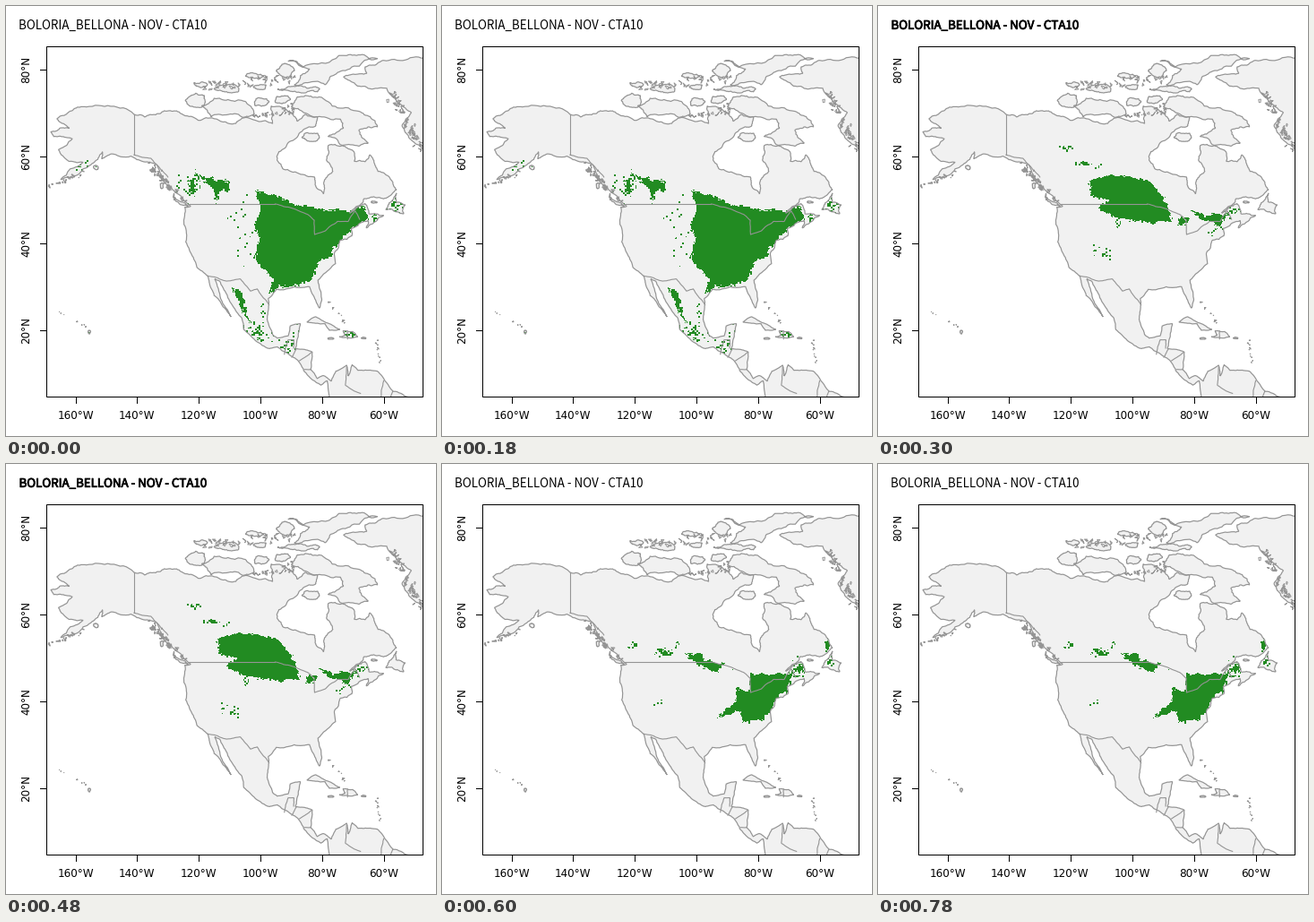
Recreate the animation shown at these times as a matplotlib script. Size 480 by 480 pixels, loop 900 ms.

```python
import numpy as np
import matplotlib.pyplot as plt
from matplotlib.animation import FuncAnimation
from matplotlib.patches import Polygon, Rectangle
from matplotlib.path import Path
from matplotlib.patheffects import withStroke

SIZE = 480
LAND, COAST, GREEN = "#f1f1f1", "#949494", (34, 139, 34, 255)
rng = np.random.default_rng(11)

fig = plt.figure(figsize=(SIZE / 72, SIZE / 72), dpi=72, facecolor="white")
ax = fig.add_axes([0, 0, 1, 1])
ax.axis("off")
box = Rectangle((44.5, 44.5), 420, 391, fill=False, ec="black", lw=1, zorder=9)
ax.add_patch(box)
lands = []


def project(*coords):
    """Degrees west, degrees north -> pixels."""
    w, n = np.reshape(coords, (-1, 2)).T
    return np.column_stack([627.9 - 3.44 * w, 459.2 - 4.86 * n])


def rough(p, amp):
    """Break each segment up by midpoint displacement."""
    for _ in range(4):
        d = np.diff(p, axis=0)
        mid = p[:-1] + d / 2 + rng.uniform(-amp, amp, (len(d), 1)) * d[:, ::-1] * (-1, 1)
        out = np.empty((len(p) + len(mid), 2))
        out[::2], out[1::2] = p, mid
        p = out
    return p


def land(p, lw=1.2):
    lands.append(Path(p))
    for patch in (Polygon(p, fc=LAND, ec="none", zorder=1),
                  Polygon(p, fill=False, ec=COAST, lw=lw, zorder=4)):
        ax.add_patch(patch)
        patch.set_clip_path(box)


def isle(*coords, amp=0.16):
    p = project(*coords)
    land(rough(np.vstack([p, p[:1]]), amp))


def oval(w, n, rw, rn):
    a = np.linspace(0, 2 * np.pi, 9)[:-1]
    r = rng.uniform(0.7, 1.15, 8)
    isle(*np.column_stack([w + rw * r * np.cos(a), n + rn * r * np.sin(a)]).ravel())


def islets(count, size, *line):
    """Tiny islands strewn along a line."""
    p = project(*line)
    for t in rng.uniform(0, 1, count):
        c = p[0] + t * (p[1] - p[0]) + rng.normal(0, size, 2)
        land(c + rng.uniform(-size, size, (4, 2)), 0.9)


def border(*coords, amp=0.05):
    line, = ax.plot(*rough(project(*coords), amp).T, color=COAST, lw=1.1, zorder=4)
    line.set_clip_path(box)


# Mainland, clockwise from the Bering Strait
north_coast = project(
    168, 65.6, 162, 66.4, 166, 68.6, 162, 70.2, 156.5, 71.3, 141, 69.6,
    134, 69.5, 128, 70.4, 125, 69.5, 115, 68.6, 108, 67.5, 106, 68.7,
    96, 67.5, 96.5, 71.5, 92, 71, 88, 68, 85.5, 69.6, 81.5, 69, 82, 67,
    87, 65.5, 94, 61, 94.5, 59, 92.5, 57, 82.4, 55.2, 82, 53, 79.5, 51.3,
    79.2, 54.5, 76.5, 56.5, 78.5, 59, 78, 62.4, 73.5, 62.4, 69.6, 61,
    69.5, 58.8, 66, 58.7, 64.5, 60.3, 61.8, 56.5, 57.5, 54.5, 55.8, 52.3,
    60, 50.2, 66.4, 50.2, 71, 46.9, 66, 49.1, 64.8, 46.8, 60, 46.4,
    65.6, 43.5, 65, 45.2, 70.5, 43.4, 70.3, 41.7, 74, 40.7, 76, 37.5)
south_coast = project(
    75.6, 35.3, 81.3, 31.5, 80.1, 26.8, 80.8, 25.1, 82.8, 28, 84, 30,
    89, 30, 94.8, 29.4, 97.4, 27.3, 97.8, 22.5, 96, 19, 94.5, 18.2, 91, 18.7,
    90.3, 21, 87, 21.5, 88.6, 15.8, 83.2, 15, 83.7, 11, 81.5, 8.9, 79.6, 9.6,
    77, 8.3, 75.5, 10.6, 72, 12, 71.5, 9.5, 70.2, 12.1, 68.3, 10.8, 62, 10.6,
    57, 6, 52, 4.6, 77.5, 3, 78.3, 8.4, 80.3, 7.4, 85.7, 10.5, 88, 13.2,
    94.5, 16.2, 97, 15.8, 105.4, 20.2, 106, 22.8, 109.5, 26.2, 113.1, 31.2,
    114.8, 31.8, 109.5, 23.1, 112.2, 25.5, 115, 28, 117.1, 32.5, 120.6, 34.5,
    124.2, 40.3)
west_coast = project(
    124.2, 40.3, 124.5, 48.3, 122.6, 48.5, 128, 52, 133.6, 58, 142, 60,
    148.5, 60.5, 151.5, 59.4, 151.2, 61, 155, 58, 164.8, 54.6, 157.5, 58.6,
    162, 58.8, 165.5, 61.5, 161, 64, 167, 64.5)
land(np.vstack([rough(north_coast, .13), rough(south_coast, .07),
                rough(west_coast, .1)]))

# Islands
isle(46, 82.7, 60, 82, 66, 80.5, 65.5, 79, 73, 78.2, 68.5, 76.1, 59, 75.6,
     55, 72, 51, 70, 54, 67, 51.5, 64, 46, 60.5, amp=.1)
isle(89.9, 71.3, 88, 73.6, 81, 73.6, 68, 70.3, 62, 66.7, 68, 66, 65, 63,
     68, 62.3, 78, 64.5, 73, 66.5, 74, 68.5, 86, 70)
isle(89, 76.4, 79, 76.4, 74, 79.5, 62, 82.4, 72, 83.1, 91, 81.8, 84, 80, 87, 78.5)
isle(117, 70, 119, 71.6, 115, 73.3, 106, 72.8, 102, 69.8, 106, 69, 116, 69)
isle(59.3, 47.7, 55.8, 51.5, 56, 49.5, 53, 48.8, 53.5, 46.8, 56, 47.2)
isle(84.9, 21.9, 82, 23.1, 74.2, 20.2, 77.6, 20, 79, 21.5, amp=.06)
isle(74.4, 18.5, 68.4, 18.5, 70, 19.7, 73.2, 19.9, 72.5, 18.9, amp=.08)
isle(128.3, 50.7, 123.4, 48.5, 125.5, 48.8)
for spot in ((121, 72.8, 4, 1.6), (99.7, 72.5, 2.7, 1.1), (93, 73.1, 2.6, 1),
             (87, 75.4, 7, .8), (92, 79.7, 3, 1.5), (111, 75.5, 5, .8),
             (100, 75.8, 2.3, .7), (119.5, 76.4, 2.5, .6), (102, 78.4, 3, .6),
             (83.5, 64.3, 2.7, 1.2), (63.2, 49.4, 1.1, .2), (77.3, 18.1, 1, .2),
             (66.5, 18.2, .8, .2), (153.4, 57.4, .9, .5), (132, 53.2, .6, .8),
             (155.5, 19.6, .45, .4)):
    oval(*spot)
islets(36, 2.6, 118, 76, 88, 78)
islets(24, 2.4, 104, 69, 88, 71)
islets(50, 2.3, 57, 74.5, 48.5, 62)
islets(50, 2.2, 136, 58, 125, 50)
islets(26, 1.4, 169, 53, 158, 56)
islets(10, .9, 78, 26.5, 72, 21.5)
islets(14, .8, 62.5, 18, 61, 12)
islets(5, .7, 159.6, 22, 156, 20.8)
islets(3, .5, 168, 25, 161.5, 23)

# Borders
border(141, 69.6, 141, 60.3, amp=0)
border(141, 60.3, 135.5, 59.5, 130, 55.2)
border(123.3, 49, 95.2, 49, amp=0)
border(95.2, 49, 89.6, 48, 84.6, 46.6, 82.5, 45.3, 82.4, 42, 79, 42.8, 75, 45,
       71.5, 45, 69.2, 47.4, 67.8, 45.5)
border(117.1, 32.5, 111, 31.3, 106.5, 31.8, 103.2, 29, 101, 29.5, 97.2, 25.9)
border(92.2, 14.5, 91, 17.8, 89.1, 17.8, 89.2, 15.9)
border(88.3, 15.7, 89.8, 13.8)
border(87.3, 13, 83.2, 15)
border(85.7, 11, 83.7, 11)
border(72, 11.5, 72.4, 7.4, 67.5, 5.5)
border(60, 8.4, 61, 4)
border(57, 6, 58, 4)
border(71.7, 19.8, 71.7, 18)

# Range rasters in pixel space
yy, xx = np.mgrid[:SIZE, :SIZE] + 0.5
warp = sum(np.kron(rng.uniform(-a, a, (2, SIZE // k, SIZE // k)), np.ones((1, k, k)))
           for a, k in ((1.5, 4), (1.2, 2)))
grid = np.column_stack([(xx + warp[0]).ravel(), (yy + warp[1]).ravel()])
grain = np.kron(rng.random((SIZE // 2, SIZE // 2)), np.ones((2, 2)))


def blob(*coords):
    return Path(np.reshape(coords, (-1, 2))).contains_points(grid).reshape(xx.shape)


def specks(x, y, rx, ry, density):
    """Cells thinning out from a centre; dense ones have a solid core."""
    return grain < density * np.exp(-((xx - x) / rx) ** 2 - ((yy - y) / ry) ** 2) - .01


def raster(*masks):
    y, x = np.nonzero(np.any(masks, axis=0))
    cells = np.column_stack([x, y]) + 0.5
    ok = np.any([p.contains_points(cells) for p in lands], axis=0)
    img = np.zeros((SIZE, SIZE, 4), np.uint8)
    img[y[ok], x[ok]] = GREEN
    return img


wide = raster(
    blob(278, 206, 303, 213, 322, 222, 360, 228, 386, 228, 398, 222, 406, 236,
         388, 248, 368, 268, 362, 280, 349, 287, 342, 305, 325, 312, 306, 313,
         293, 321, 299, 305, 279, 285, 282, 254, 277, 245, 284, 228),
    blob(208, 184, 222, 191, 250, 196, 250, 206, 238, 207, 236, 222, 231, 204),
    blob(253, 313, 262, 320, 273, 354, 264, 343),
    specks(207, 201, 6, 9, .9), specks(265, 225, 14, 18, .1),
    specks(268, 272, 10, 22, .1), specks(190, 205, 14, 16, .15),
    specks(82, 182, 20, 7, .25), specks(414, 238, 7, 5, .5),
    specks(435, 221, 9, 7, .45), specks(280, 364, 14, 8, .45),
    specks(315, 378, 9, 9, .4), specks(321, 362, 4, 9, .3),
    specks(385, 366, 6, 4, .5), specks(91, 361, 6, 6, .4),
    specks(289, 340, 5, 9, .25))
north = raster(
    blob(236, 195, 262, 188, 301, 194, 319, 212, 329, 241, 300, 243, 268, 237,
         245, 226, 260, 217, 238, 212),
    blob(350, 228, 366, 234, 392, 232, 378, 248, 374, 241, 360, 239),
    specks(339, 240, 4, 4, 2), specks(394, 230, 7, 5, .4),
    specks(372, 251, 9, 5, .3), specks(254, 275, 13, 9, .2),
    specks(209, 159, 7, 3, .35), specks(231, 176, 7, 2, 1),
    specks(244, 179, 4, 4, .5), specks(338, 212, 3, 3, .4),
    specks(268, 240, 3, 6, .5))
east = raster(
    blob(343, 235, 392, 234, 386, 252, 370, 266, 370, 273, 355, 287, 336, 288,
         334, 275, 306, 285, 328, 264, 329, 250, 344, 255),
    blob(272, 213, 290, 211, 293, 220, 315, 223, 308, 232, 287, 225),
    specks(248, 210, 7, 4, 1), specks(399, 228, 6, 8, 1),
    specks(430, 202, 2, 5, 2), specks(434, 219, 4, 6, .6),
    specks(213, 202, 4, 4, .5), specks(262, 203, 3, 4, .5),
    specks(322, 232, 8, 3, .2), specks(240, 267, 12, 4, .1))

layers = [wide, north, east]
ranges = ax.imshow(wide, extent=(0, SIZE, SIZE, 0), interpolation="nearest",
                   aspect="auto", zorder=2)

# Axes and title
label = dict(size=12, family="DejaVu Sans", ha="center")
for i in range(6):
    x = 77.5 + 68.8 * i
    ax.plot([x, x], [435.5, 442.5], color="black", lw=1)
    ax.text(x, 461, f"{160 - 20 * i}°W", **label)
for i in range(4):
    y = 70.5 + 97.2 * i
    ax.plot([37.5, 44.5], [y, y], color="black", lw=1)
    ax.text(22.8, y, f"{80 - 20 * i}°N", rotation=90, va="center", **label)
title = ax.text(14.5, 25.8, "BOLORIA_BELLONA - NOV - CTA10", size=13.3,
                family=["Noto Sans CJK JP", "Liberation Sans"])
ax.set_xlim(0, SIZE)
ax.set_ylim(SIZE, 0)


def update(i):
    ranges.set_data(layers[i])
    bold = [withStroke(linewidth=0.8, foreground="black")] if i == 1 else []
    title.set_path_effects(bold)
    return ranges, title


anim = FuncAnimation(fig, update, frames=3, interval=300, repeat=True, repeat_delay=0)
plt.show()
```
